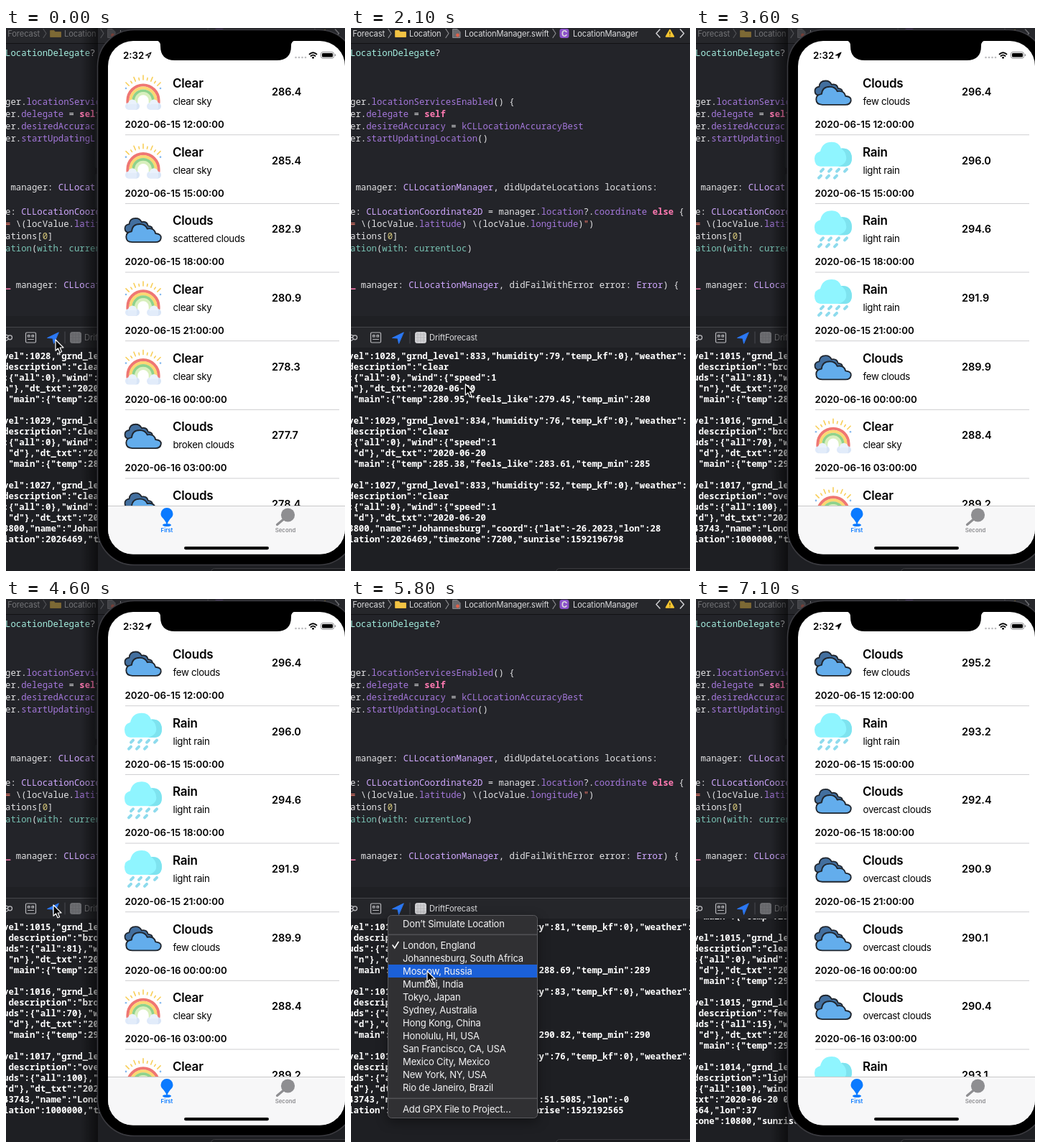
Animation of 472 by 756 pixels, one loop 7200 ms. Source, as an HTML page:

```html
<!DOCTYPE html>
<html lang="en">
<head>
<meta charset="utf-8">
<title>Location simulator</title>
<style>
html, body { margin: 0; width: 100%; height: 100%; overflow: hidden; background: #000; }
svg { display: block; width: 472px; height: 756px; }
text { white-space: pre; font-family: Inter, sans-serif; }
.code, .log { font: 500 12.3px "Noto Sans Mono", monospace; }
.log { font-weight: 700; fill: #fff; }
.w { fill: #e4e4e6; } .p { fill: #a578dc; } .c { fill: #d0a8ff; } .k { fill: #ff7ab2; font-weight: 700; }
.t { fill: #78c2b3; } .l { fill: #a5efe0; } .r { fill: #ff8170; } .y { fill: #d9c97c; }
.bar { font-size: 11.2px; letter-spacing: -.12px; fill: #dcdcde; }
.item { font-size: 13.1px; letter-spacing: -.2px; fill: #f4f4f5; }
.head { font-size: 17px; font-weight: 600; letter-spacing: -.2px; }
.sub { font-size: 13.3px; letter-spacing: -.3px; }
.date { font-size: 13.3px; font-weight: 600; }
.temp { font-size: 14.5px; font-weight: 600; }
.tab { font-size: 7.8px; font-weight: 600; text-anchor: middle; }
#menu { filter: drop-shadow(0 5px 8px rgba(0, 0, 0, .4)); }
</style>
</head>
<body>
<svg id="stage" viewBox="0 0 472 756"></svg>
<script>
const LOOP = 7200, STEP = 100;
const APP = "DriftForecast";
const esc = s => s.replace(/&/g, "&amp;").replace(/</g, "&lt;");
const text = (x, y, cls, s, extra = "") => `<text x="${x}" y="${y}" class="${cls}" ${extra}>${esc(s)}</text>`;
const rect = (x, y, w, h, fill, r = 0) => `<rect x="${x}" y="${y}" width="${w}" height="${h}" rx="${r}" fill="${fill}"/>`;
const circle = (x, y, r, fill) => `<circle cx="${x}" cy="${y}" r="${r}" fill="${fill}"/>`;
const path = (d, stroke, width = 1.3, fill = "none") =>
  `<path d="${d}" stroke="${stroke}" stroke-width="${width}" fill="${fill}" stroke-linejoin="round" stroke-linecap="round"/>`;
const group = (id, body) => `<g id="${id}">${body}</g>`;

// Editor: "~" starts a run, its first letter is the colour class.
const code = (y, s) => `<text x="-1" y="${y + 4}" class="code">` +
  s.split("~").slice(1).map(r => `<tspan class="${r[0]}">${esc(r.slice(1))}</tspan>`).join("") + "</text>";

const editor = [
  [35, "~lLocationDelegate~w?"],
  [103, "~wger.~plocationServicesEnabled~w() {"],
  [120, "~wer.~pdelegate~w = ~kself"],
  [137, "~wer.~pdesiredAccuracy~w = ~pkCLLocationAccuracyBest"],
  [154, "~wer.~pstartUpdatingLocation~w()"],
  [222, "~w manager: ~cCLLocationManager~w, didUpdateLocations locations:"],
  [256, "~we: ~cCLLocationCoordinate2D~w = manager.~plocation~w?.~pcoordinate~w ~kelse~w {"],
  [273, "~r= ~w\\(locValue.~platitude~w) \\(locValue.~plongitude~w)~r\"~w)"],
  [290, "~wations[~y0~w]"],
  [307, "~tation~w(~twith~w: ~tcurrentLoc~w)"],
  [358, "~k_~w manager: ~cCLLocationManager~w, didFailWithError error: ~cError~w) {"]
].map(l => code(...l)).join("");

const chevron = x => path(`M${x - 2} 1.5L${x + 2} 7.5L${x - 2} 13.5`, "#8d8d91", 1.2);
const crumbs =
  text(47, 11.5, "bar", APP.slice(5), 'text-anchor="end"') + chevron(54) +
  path("M62 3.5h5l1.5 2H76.5V12.5H62z", "#e8b53a", 1, "#f2c445") + text(81, 11.5, "bar", "Location") + chevron(134) +
  path("M142 1.5h6l4 4V13.5H142z", "#8a8a8e", 1, "#6a6a6e") + circle(148.5, 10, 2.4, "#e0604a") +
  text(158, 11.5, "bar", "LocationManager.swift") + chevron(283) +
  rect(290.5, 1, 13, 13, "#8b52c9", 3) + text(297, 11.6, "bar", "C", 'text-anchor="middle" font-weight="700"') +
  text(309, 11.5, "bar", "LocationManager") +
  path("M430 2L425 7.5L430 13", "#d0d0d3", 1.5) + path("M458.5 2L463.5 7.5L458.5 13", "#d0d0d3", 1.5) +
  path("M444 2.5L449.5 12H438.5z", "#f7c632", 1.5, "#f7c632") + path("M444 5.5V8.5M444 10.6V10.7", "#4a3a00", 1.2);

let grid = "";
for (let i = 1; i < 4; i++) grid += `M${89 + i * 4} 424V438M90 ${423 + i * 4}H104`;
const tools =
  path("M-2 431H2M4 428.5L-1 427M4 433L0 435.5", "#b9b9bd", 1.3) + `<circle cx="5.5" cy="430.8" r="3" stroke="#b9b9bd" fill="none" stroke-width="1.3"/>` +
  path("M29 424H40Q41.5 424 41.5 425.5V436.5Q41.5 438 40 438H29Q27.5 438 27.5 436.5V425.5Q27.5 424 29 424zM30.5 427.5H33V430H30.5zM36 427.5H38.5V430H36zM30.5 433.5H38.5", "#b9b9bd", 1.2) +
  path("M82 423V439", "#4b4b50", 1);
const target = rect(89, 423, 16, 16, "#d2d2d5", 3.5) + path(grid, "#b2b2b7", .7) + text(109, 435, "bar", APP);

// Console output of the three places.
const report = (p, ground, hum, desc, sky, day, temp) => [
  `vel":${p},"grnd_level":${ground},"humidity":${hum},"temp_kf":0},"weather":`,
  desc, `${sky}},"wind":{"speed":1`, `${day}"},"dt_txt":"2020-06-20`,
  temp && ` "main":{"temp":${temp}`, ""
];
const reading = (t, feels, min) => `${t},"feels_like":${feels},"temp_min":${min}`;
const clear = 'description":"clear', noCloud = ':{"all":0';
const logs = [
  [457, [
    ...report(1028, 833, 79, clear, noCloud, "n", reading(280.95, 279.45, 280)),
    ...report(1029, 834, 76, clear, noCloud, ' "d', reading(285.38, 283.61, 285)),
    ...report(1027, 833, 52, clear, noCloud, ' "d', "").slice(0, 4),
    '3800,"name":"Johannesburg","coord":{"lat":-26.2023,"lon":28',
    'lation":2026469,"timezone":7200,"sunrise":1592196798'], 43],
  [457, [
    ...report(1015, 1012, 81, ' description":"broken', 'uds":{"all":81', ' "n', reading(289.05, 288.69, 289)),
    ...report(1016, 1013, 83, ' description":"broken', 'uds":{"all":70', ' "d', reading(290.87, 290.82, 290)),
    ...report(1017, 1014, 76, ' description":"overcast', 'uds":{"all":100', '"d', "").slice(0, 4),
    '43743,"name":"London","coord":{"lat":51.5085,"lon":-0',
    'lation":1000000,"timezone":3600,"sunrise":1592192565'], 50],
  [442, [
    ' "main":{"temp":292.14', "",
    ...report(1015, 997, 60, clear, noCloud, ' "d', "295.35"),
    ...report(1015, 996, 52, ' description":"few', 'uds":{"all":15', ' "d', "297.02"),
    ...report(1014, 996, 64, 'description":"light', ':{"all":100', "", "").slice(0, 3),
    'txt":"2020-06-20 0', '564,"lon":37', 'tone":10800,"sunrise":1592181870'], 59]
].map(([y, lines, sec], i) => group("log" + i,
  lines.map((s, n) => s && text(-4, y + 4 + n * 15, "log", s)).join("") +
  text(0.5, 761, "log", `5.00m (speed -1.00 mps / course -1.00) @ 6/15/20, 2:32:${sec} PM Gulf`, `id="fixed${i}"`)
)).join("");

// Weather icons, centred on 0,0.
const cloud = "M-17 17Q-26 17-26 9Q-26 2-18 1Q-17-10-6-10Q2-10 5-3Q15-5 17 4Q26 5 25 11Q24 17 17 17z";
const rain = "M-18 8Q-26 7-26-3Q-26-11-18-13Q-15-26-2-26Q8-26 11-17Q25-18 26-4Q26 8 16 8z";
const arc = (r, colour) => path(`M${-r} 15V12A${r} ${r} 0 0 1 ${r} 12V15`, colour, 4.2);
let rays = "", drops = "";
for (let i = 0; i < 9; i++) {
  const a = (225 + i * 11.25) * Math.PI / 180, c = Math.cos(a), s = Math.sin(a), far = i % 2 ? 31 : 34;
  rays += `M${c * 28} ${11 + s * 28}L${c * far} ${11 + s * far}`;
}
for (let i = 0; i < 7; i++) {
  const x = -16 + (i % 4) * 11 + (i > 3 ? -3 : 0), y = i > 3 ? 21 : 12;
  drops += `M${x + 2} ${y}L${x - 1} ${y + 3}`;
}
const puff = x => circle(x - 5, 20, 5, "#dfeafa") + circle(x + 5, 20, 5, "#d7e4f6") + circle(x, 16.5, 6, "#eaf2fc") + rect(x - 6, 17, 12, 8, "#e2ecfa", 3);
const icons = {
  Clear: path(rays, "#f8cf5a", 1.6) + arc(21.5, "#ef7773") + arc(17.5, "#fbd873") + arc(13.5, "#8fd28c") + arc(9.8, "#d8efbd") +
    puff(-15) + puff(15) + [-24, 24].map(x => circle(x, -5, 1.3, "#86b9ee")).join(""),
  Clouds: `<g transform="translate(-6 -8) scale(.75)">${path(cloud, "#20262e", 2.4, "#426f9f")}</g>` +
    `<g transform="translate(1 2) scale(.95 .93)">${path(cloud, "#20262e", 2, "#63adec")}</g>`,
  Rain: path(rain, "none", 0, "#8ff5ff") + path("M11-17Q25-18 26-4Q26 8 16 8H7Q20 4 18-6Q17-13 11-17z", "none", 0, "#7ee3ef") + path(drops, "#8edbed", 4)
};
const defs = Object.entries(icons).map(([name, body]) => group(name, body)).join("") +
  `<clipPath id="screen">${rect(142, 18, 330, 714.6, "#fff", 35)}</clipPath>
   <clipPath id="console">${rect(0, 445, 472, 311, "#fff")}</clipPath>
   <linearGradient id="shade"><stop offset="0" stop-opacity="0"/><stop offset="1" stop-opacity=".55"/></linearGradient>`;

const clearSky = ["Clear", "clear sky"], rainy = ["Rain", "light rain"];
const clouds = kind => ["Clouds", kind + " clouds"];
const overcast = clouds("overcast"), few = clouds("few"), broken = clouds("broken");
const lists = [
  [[clearSky, 286.4], [clearSky, 285.4], [clouds("scattered"), 282.9], [clearSky, 280.9], [clearSky, 278.3], [broken, 277.7], [broken, 278.4]],
  [[few, 296.4], [rainy, 296], [rainy, 294.6], [rainy, 291.9], [few, 289.9], [clearSky, 288.4], [clearSky, 289.2]],
  [[few, 295.2], [rainy, 293.2], [overcast, 292.4], [overcast, 290.9], [overcast, 290.1], [overcast, 290.4], [rainy, 293.1]]
].map((rows, n) => group("list" + n, rows.map(([[name, detail], temp], i) => {
  const hour = String((12 + i * 3) % 24).padStart(2, "0");
  return `<g transform="translate(0 ${i * 95.65})"><use href="#${name}" x="191" y="89"/>` +
    text(232, 83, "head", name) + text(232.5, 107, "sub", detail) + text(370, 94, "temp", temp.toFixed(1)) +
    text(165.5, 139, "date", `2020-06-${i < 4 ? 15 : 16} ${hour}:00:00`) + rect(166, 148.3, 298, .9, "#c9c9cc") + "</g>";
}).join(""))).join("");

const status = text(163, 42.5, "temp", "2:32", 'style="font-size:13.3px"') +
  `<path id="fix" d="M202 34L194.5 38H198.2V42z" stroke="#000" stroke-width="1.1" stroke-linejoin="round"/>` +
  [403.5, 408, 412.5, 417].map(x => circle(x, 41, 1.3, "#bcbcbf")).join("") +
  path("M422.5 36.5Q427.5 32 432.5 36.5M424.5 39Q427.5 36.3 430.5 39", "#000", 1.8) + circle(427.5, 41.3, 1.4, "#000") +
  `<rect x="438.5" y="33.5" width="18" height="8.6" rx="2.6" fill="none" stroke="#8d8d90"/>` +
  rect(440, 35, 15, 5.6, "#000", 1.4) + rect(457.8, 36.3, 1.4, 3, "#8d8d90", .7);
const tabs = rect(142, 665, 330, 68, "#f7f7f8") + rect(142, 665, 330, .8, "#bdbdc0") +
  path("M224 691.5Q222.5 687 219 683Q215.5 680 215.5 676.5A8.5 8.5 0 0 1 232.5 676.5Q232.5 680 229 683Q225.5 687 224 691.5z", "none", 0, "#0a7aff") +
  `<ellipse cx="224" cy="692" rx="6" ry="2" fill="#0a7aff"/>` + text(224, 702, "tab", "First", 'fill="#0a7aff"') +
  path("M387 683.5L377.5 691.5", "#8e8e91", 3.2) + circle(392.5, 678, 9.6, "#8e8e91") + text(389, 702, "tab", "Second", 'fill="#8e8e91"') +
  rect(248, 722, 118, 4.2, "#000", 2.1);
const phone = rect(104, 0, 24, 756, "url(#shade)") + rect(123.5, 127, 5, 68, "#17181b", 2) + rect(123.5, 203, 5, 48, "#17181b", 2) +
  `<rect x="127.5" y="2.5" width="359" height="745" rx="51" fill="#000" stroke="#3b3b40" stroke-width="1.6"/>` +
  `<g clip-path="url(#screen)">${rect(142, 18, 330, 715, "#fff")}${lists}${tabs}${status}</g>` +
  path("M207 17Q215 17 215 25Q215 45 235 45H377Q397 45 397 25Q397 17 405 17z", "none", 0, "#000");

const items = ["London, England", "Johannesburg, South Africa", "Moscow, Russia", "Mumbai, India", "Tokyo, Japan", "Sydney, Australia",
  "Hong Kong, China", "Honolulu, HI, USA", "San Francisco, CA, USA", "Mexico City, Mexico", "New York, NY, USA", "Rio de Janeiro, Brazil"]
  .map((s, i) => [482 + i * 18, s]);
items.unshift([452, "Don’t Simulate Location"]);
items.push([710, "Add GPX File to Project…"]);
const menu = `<rect x="51.5" y="440.5" width="208" height="282" rx="5" fill="#303033" stroke="#59595d"/>` +
  `<rect id="mark" x="52" width="207" height="18" fill="#1b60d8"/>` +
  rect(52, 466.5, 207, 1.6, "#515155") + rect(52, 694.5, 207, 1.6, "#515155") +
  items.map(([y, s]) => text(72, y + 4.6, "item", s)).join("") +
  `<path id="tick" d="M58 0L60.8 4L66-4.5" fill="none" stroke="#fff" stroke-width="1.6" stroke-linecap="round"/>`;

const stage = document.getElementById("stage");
stage.innerHTML = `<defs>${defs}</defs>` +
  rect(0, 0, 472, 756, "#232429") + rect(0, 0, 472, 21, "#26272b") + rect(0, 21, 472, 1, "#121214") +
  group("crumbs", crumbs) + editor +
  rect(0, 401, 472, 15, "#1f2024") + rect(0, 416, 472, 29, "#25262a") + rect(0, 416, 472, 1, "#45464a") +
  tools + path("M73 424L57.5 431.5L65 432L66.5 439z", "#2b78f5", 1, "#2b78f5") + group("target", target) +
  rect(0, 445, 472, 311, "#1e1f23") + `<g clip-path="url(#console)">${logs}</g>` +
  `<rect x="285.5" y="752.5" width="200" height="20" rx="5" fill="#1a1b1e" stroke="#3c3c40"/>` +
  group("menu", menu) + group("phone", phone) +
  group("cursor", path("M0 0V15.2L3.5 12L6 17.8L8.6 16.7L6.1 11H11z", "#fff", 1.2, "#000"));

const el = id => document.getElementById(id);
const show = (id, on) => { el(id).style.display = on ? "" : "none"; };
const within = (t, ...spans) => spans.some(([a, b]) => t >= a && t < b);

// Pointer stops: time, x, y.
const route = [
  [0, 69, 434], [1100, 69, 434], [1400, 80, 460], [1700, 98, 484], [2000, 100, 484], [2400, 480, 560],
  [4100, 480, 560], [4500, 66, 426], [4700, 66, 426], [4900, 72, 438], [5000, 82, 461], [5200, 100, 545],
  [5400, 105, 655], [5700, 106, 518], [5900, 106, 518], [6200, 480, 540], [LOOP, 480, 540]
];
function pointer(t) {
  const i = route.findIndex(r => r[0] > t), [t0, x0, y0] = route[i - 1], [t1, x1, y1] = route[i];
  const u = (t - t0) / (t1 - t0), e = u * u * (3 - 2 * u);
  return [x0 + (x1 - x0) * e, y0 + (y1 - y0) * e];
}

function draw(t) {
  const place = t < 3600 ? 0 : t < 7000 ? 1 : 2;
  const menuOpen = within(t, [400, 2000], [4800, 5900]);
  const scrolled = within(t, [2300, 3600], [6200, 7000]);
  const inactive = within(t, [0, 200], [3300, 4700], [7000, LOOP]);
  for (let i = 0; i < 3; i++) {
    show("list" + i, i === place);
    show("log" + i, i === place);
    show("fixed" + i, scrolled);
    el("log" + i).setAttribute("transform", `translate(0 ${scrolled ? -45 : 0})`);
  }
  show("phone", within(t, [0, 200], [2800, 4700], [6700, LOOP]));
  show("menu", menuOpen);
  for (const id of ["crumbs", "target"]) el(id).setAttribute("opacity", inactive ? .42 : 1);
  el("fix").setAttribute("fill", t < 200 ? "none" : "#000");

  const [x, y] = pointer(t);
  el("cursor").setAttribute("transform", `translate(${x} ${y})`);
  const hit = items.find(([cy]) => Math.abs(y - cy) <= 9.5);
  show("mark", hit);
  if (hit) el("mark").setAttribute("y", hit[0] - 9);
  el("tick").setAttribute("transform", `translate(0 ${place ? 482 : 500})`);
}

const start = performance.now();
function tick() {
  const t = (performance.now() - start) % LOOP;
  draw(Math.floor(t / STEP) * STEP);
  requestAnimationFrame(tick);
}
tick();
</script>
</body>
</html>
```
